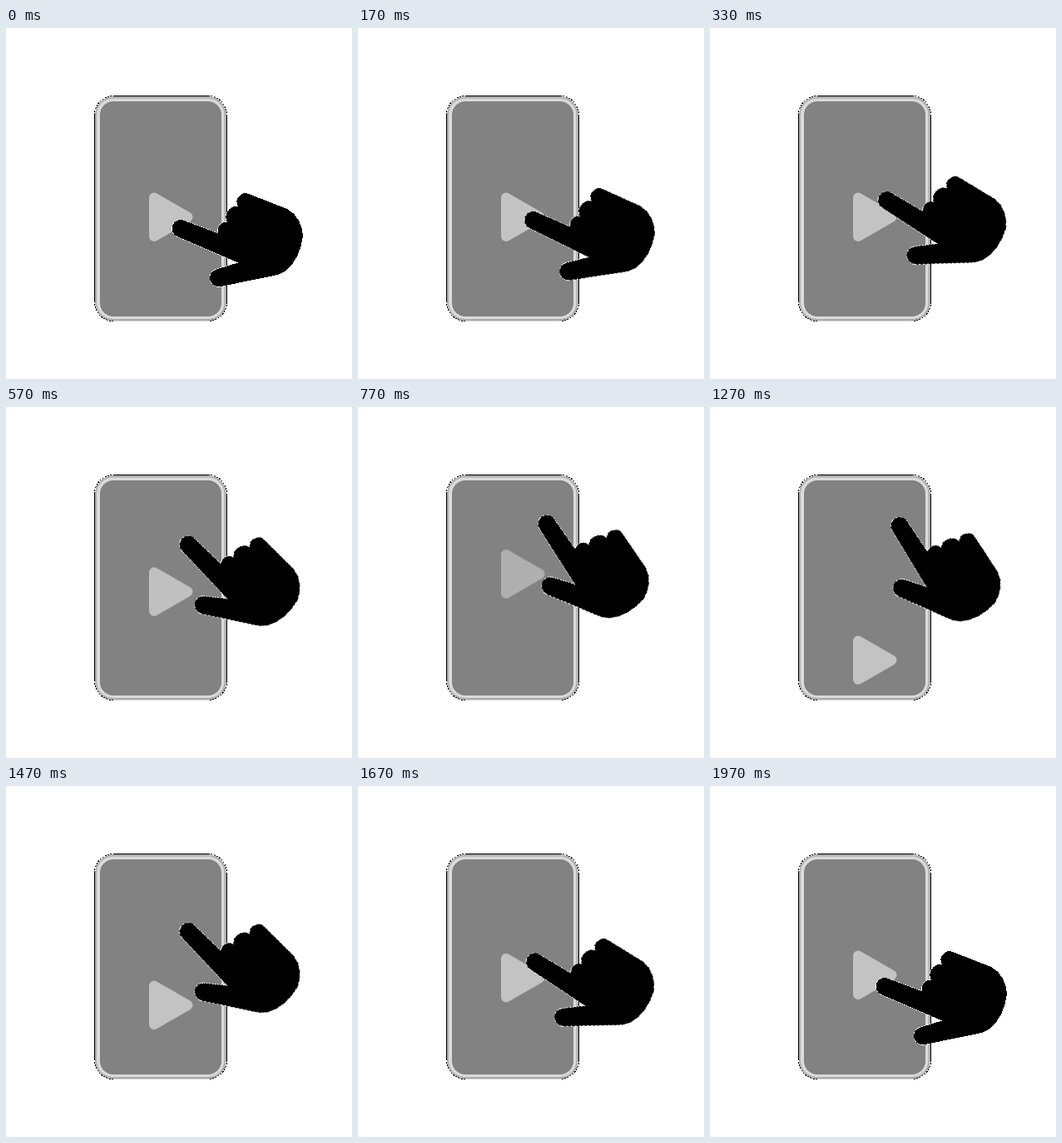
An HTML page that plays this animation: 416x421 px, repeating every 2.46 s.

```html
<!DOCTYPE html>
<html lang="en">
<head>
<meta charset="utf-8">
<title>Swipe up</title>
<style>
  html, body { margin: 0; width: 100%; height: 100%; overflow: hidden; background: #fff; }
  svg { display: block; width: 416px; height: 421px; }
  .edge { fill: none; stroke: #000; shape-rendering: crispEdges; }
  .play { fill: #c3c3c3; stroke: #c3c3c3; stroke-width: 12; stroke-linejoin: round; }
  .hand { fill: #000; stroke: #fff; paint-order: stroke; shape-rendering: crispEdges; }
</style>
</head>
<body>
<svg viewBox="0 0 416 421">
  <defs>
    <path id="triangle" d="M178 203.5V250L218.5 226.8Z"/>
    <clipPath id="phoneClip"><rect x="107" y="82" width="158.5" height="269.5" rx="22"/></clipPath>
  </defs>

  <rect x="107" y="82" width="158" height="269.6" rx="22.5" fill="#ababab"/>
  <path class="edge" d="M106.5 104V329M129 81.5H243M265.5 104V329"/>
  <path class="edge" stroke-dasharray="2 1.5" d="
    M106.5 104A22.5 22.5 0 0 1 129 81.5 M243 81.5A22.5 22.5 0 0 1 265.5 104
    M265.5 329A22.5 22.5 0 0 1 243 351.5 M129 351.5A22.5 22.5 0 0 1 106.5 329"/>
  <rect x="109" y="84.5" width="153.5" height="264.5" rx="19.5" fill="#dadada"/>
  <rect x="113" y="88" width="146" height="258" rx="16" fill="#828282"/>

  <g clip-path="url(#phoneClip)">
    <g id="oldPlay"><use href="#triangle" class="play"/></g>
    <g id="newPlay" opacity="0"><use href="#triangle" class="play"/></g>
  </g>

  <g id="lift">
    <g id="turn">
      <path class="hand" transform="translate(-280 -249)" d="
        M205.1 249.8 A10.5 10.5 0 0 1 212.8 230.4 L255.5 246.5
        A9.8 9.8 0 0 1 266 233 A13 13 0 0 1 279 214
        A10.5 10.5 0 0 1 292 199 L338 217
        C350 223 357 237 357 250 C355 266 348 283 335 292
        Q329 296 322 297 L258.5 310
        A10.6 10.6 0 0 1 253 289.4 L279 281.5 Z"/>
    </g>
  </g>
</svg>
<script>
  const LOOP = 2460, PEAK = 1050, REST = 1970;
  const smooth = 'cubic-bezier(.333, 0, .667, 1)';
  const quick = 'cubic-bezier(.31, 0, .47, 1)';

  // Each step: [time in ms, value, easing towards the next step]
  function run(id, prop, format, steps) {
    const frames = steps.map(([ms, value, easing = smooth]) =>
      ({ offset: ms / LOOP, [prop]: format(value), easing }));
    document.getElementById(id)
      .animate(frames, { duration: LOOP, iterations: Infinity })
      .startTime = document.timeline.currentTime;
  }

  const shift = y => `translate(0px, ${y}px)`;
  const same = v => v;

  run('lift', 'transform', y => `translate(280px, ${y}px)`,
    [[0, 249, quick], [PEAK, 180], [REST, 249], [LOOP, 249]]);
  run('turn', 'transform', a => `rotate(${a}deg)`,
    [[0, 0], [PEAK, 41.5], [REST, 0], [LOOP, 0]]);

  run('oldPlay', 'transform', shift,
    [[0, 0], [430, 0], [1470, -105], [LOOP, -105]]);
  run('oldPlay', 'opacity', same,
    [[0, 1], [470, 1], [1310, 0], [LOOP, 0]]);

  run('newPlay', 'transform', shift,
    [[0, 93], [1100, 93], [1745, 0], [LOOP, 0]]);
  run('newPlay', 'opacity', same,
    [[0, 0], [1090, 0], [1230, 1], [LOOP, 1]]);
</script>
</body>
</html>
```
